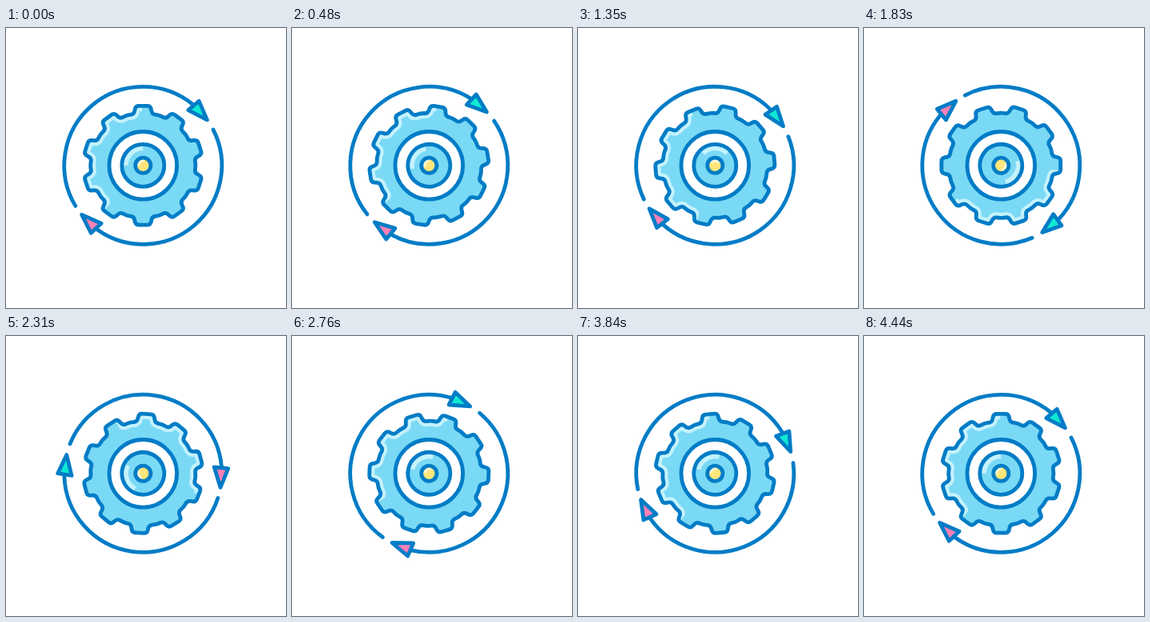
Animation of 350 by 350 pixels, one loop 4500 ms. Source, as an HTML page:

```html
<!DOCTYPE html>
<html>
<head>
<meta charset="utf-8">
<style>
html, body { margin: 0; width: 100%; height: 100%; overflow: hidden; background: #fff; }
svg { display: block; width: 100vw; height: 100vh; }
.line { fill: none; stroke: #007cc6; stroke-width: 4.8; stroke-linecap: round; stroke-linejoin: round; }
</style>
</head>
<body>
<svg viewBox="0 0 350 350">
  <defs>
    <clipPath id="gearClip"><path class="gearShape"/></clipPath>
    <clipPath id="rimClip"><path id="rimWedge"/></clipPath>
  </defs>
  <g transform="translate(171.3 171.8)">
    <g id="gear">
      <path class="gearShape" fill="#7ad9f5"/>
      <g clip-path="url(#gearClip)">
        <path class="gearShape" clip-path="url(#rimClip)" fill="none" stroke="#c4f2fc" stroke-width="13" stroke-linejoin="round"/>
      </g>
      <path class="gearShape line"/>
    </g>
    <circle class="line" r="42.3" style="fill:#fff"/>
    <g id="hub">
      <circle r="26.5" fill="#7ad9f5"/>
      <path id="hubShine" fill="none" stroke="#c4f2fc" stroke-width="6"/>
      <circle class="line" r="26.5"/>
      <circle r="9.6" fill="#ffe67a"/>
      <path id="coreShine" fill="none" stroke="#fff6cf" stroke-width="4"/>
      <circle class="line" r="9.6"/>
    </g>
    <g id="arrows">
      <path id="arcs" class="line"/>
      <path id="cyanHead" class="line" style="fill:#10e8d4"/>
      <path id="pinkHead" class="line" style="fill:#ff80b8"/>
    </g>
  </g>
</svg>
<script>
const $ = id => document.getElementById(id);
const R = 98.5;

// Angles are in degrees, clockwise from the right.
function polar(r, deg) {
  const a = deg * Math.PI / 180;
  return [r * Math.cos(a), r * Math.sin(a)];
}
const str = p => p.map(n => n.toFixed(2)).join(' ');
const arc = (r, a, b) =>
  `M${str(polar(r, a))}A${r} ${r} 0 ${b - a > 180 ? 1 : 0} 1 ${str(polar(r, b))}`;

function toward(p, q, d) {
  const k = d / Math.hypot(q[0] - p[0], q[1] - p[1]);
  return [p[0] + (q[0] - p[0]) * k, p[1] + (q[1] - p[1]) * k];
}

function roundedShape(pts, d) {
  const n = pts.length;
  return pts.map((p, i) => {
    const a = toward(p, pts[(i + n - 1) % n], d);
    const b = toward(p, pts[(i + 1) % n], d);
    return `${i ? 'L' : 'M'}${str(a)}Q${str(p)} ${str(b)}`;
  }).join('') + 'Z';
}

function gearPath() {
  const pts = [];
  for (let i = 0; i < 10; i++) {
    const a = i * 36 - 90;
    pts.push(polar(65, a - 10.1), polar(75, a - 7.1),
             polar(75, a + 7.1), polar(65, a + 10.1), polar(66, a + 18));
  }
  return roundedShape(pts, 4);
}

const head = turn =>
  'M' + [[89.3, -50.8], [106.6, -49], [98.3, -35.4]]
    .map(([r, a]) => str(polar(r, a + turn))).join('L') + 'Z';

document.querySelectorAll('.gearShape').forEach(e => e.setAttribute('d', gearPath()));
$('rimWedge').setAttribute('d', arc(90, 131, 269) + 'L0 0Z');
$('hubShine').setAttribute('d', arc(21.5, 180, 270));
$('coreShine').setAttribute('d', arc(6, 170, 280));
$('arcs').setAttribute('d', arc(R, -27, 126) + arc(R, 149.1, 309.5));
$('cyanHead').setAttribute('d', head(0));
$('pinkHead').setAttribute('d', head(176.6));

// Ease with flat ends; x1 and x2 are the horizontal handle positions.
function ease(u, x1, x2) {
  let lo = 0, hi = 1;
  for (let i = 0; i < 24; i++) {
    const s = (lo + hi) / 2, q = 1 - s;
    if (3 * x1 * s * q * q + 3 * x2 * s * s * q + s * s * s < u) lo = s;
    else hi = s;
  }
  return lo * lo * (3 - 2 * lo);
}

// Keys: [time, angle, x1, x2], the handles shaping the way to that key.
function track(keys, t) {
  for (let i = 1; i < keys.length; i++) {
    const [t0, v0] = keys[i - 1], [t1, v1, x1 = 1 / 3, x2 = 2 / 3] = keys[i];
    if (t <= t1) return v0 + (v1 - v0) * ease((t - t0) / (t1 - t0), x1, x2);
  }
  return keys[keys.length - 1][1];
}

const tracks = {
  gear: [[0, 0], [912, 16], [3150, -371], [4440, -360]],
  hub: [[0, 0], [710, -15], [3130, 392, 0.42, 0.57], [4440, 360]],
  arrows: [[0, 0], [970, -15], [3390, 392, 0.42, 0.57], [4440, 360]]
};

function draw(t) {
  for (const id in tracks)
    $(id).setAttribute('transform', `rotate(${track(tracks[id], t).toFixed(3)})`);
}

const start = performance.now();
function tick() {
  draw((performance.now() - start) % 4500);
  requestAnimationFrame(tick);
}
tick();
</script>
</body>
</html>
```
